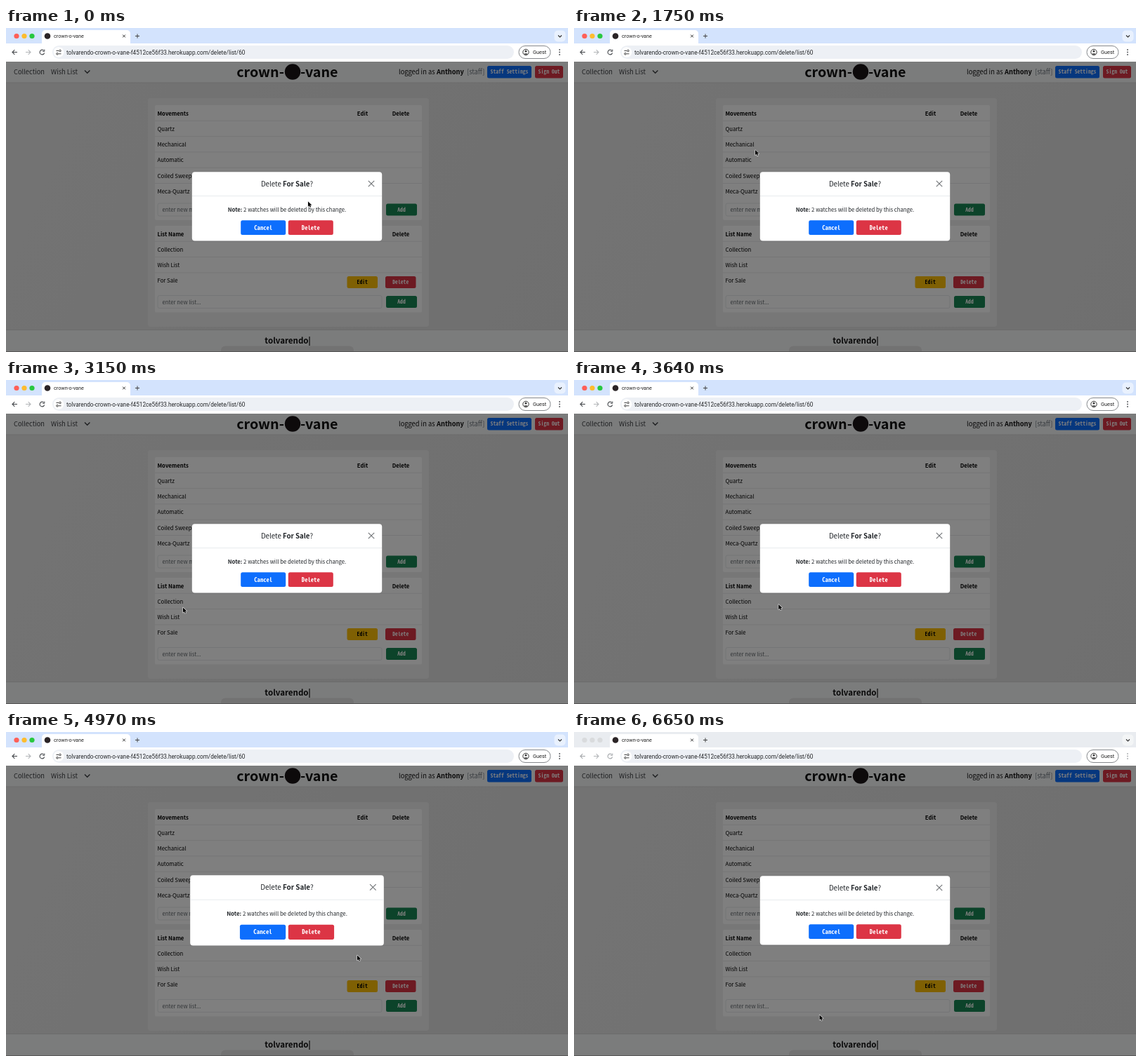
Write an HTML page with a canvas that moves like this. It is 800 by 462 pixels and loops after 6720 ms.

```html
<!DOCTYPE html>
<html lang="en">
<head>
<meta charset="utf-8">
<title>Delete list dialog</title>
<style>
html, body { margin: 0; width: 100%; height: 100%; overflow: hidden; }
canvas { display: block; width: 800px; height: 462px; }
</style>
</head>
<body>
<canvas id="stage" width="800" height="462"></canvas>
<script>
const ctx = document.getElementById('stage').getContext('2d');
const LOOP = 6720;
const BLUR_AT = 6650;
const SANS = '"Noto Sans CJK JP", "Noto Sans", sans-serif';
const MONO = '"Noto Sans Mono CJK JP", "Noto Sans Mono", monospace';
const UI = 'Roboto, "Liberation Sans", sans-serif';
const BLUE = '#0d6efd', RED = '#dc3545', GREEN = '#198754', YELLOW = '#ffc107';
const BRAND = 'crown-o-vane';
const AUTHOR = 'tolvarendo';

// time, x, y of the pointer tip
const POINTER = [
  [0, 430, 247.5], [300, 430, 247.5], [950, 428, 169], [1300, 428, 169],
  [1900, 227, 175], [2500, 227, 175], [3100, 252, 324.5], [3500, 252, 324.5],
  [4150, 576.5, 287], [4350, 576.5, 287], [4800, 500, 318.5], [5400, 500, 318.5],
  [6200, 349.5, 403.5], [LOOP, 349.5, 403.5]
];
const CLICKS = [2000, 4720];

function box(x, y, w, h, r, fill, stroke) {
  ctx.beginPath();
  ctx.roundRect(x, y, w, h, r);
  if (fill) { ctx.fillStyle = fill; ctx.fill(); }
  if (stroke) { ctx.strokeStyle = stroke; ctx.lineWidth = 1; ctx.stroke(); }
}

function dot(x, y, r, fill) {
  ctx.beginPath();
  ctx.arc(x, y, r, 0, Math.PI * 2);
  ctx.fillStyle = fill;
  ctx.fill();
}

function line(points, color, width = 1) {
  ctx.beginPath();
  points.forEach(([x, y], i) => i ? ctx.lineTo(x, y) : ctx.moveTo(x, y));
  ctx.strokeStyle = color;
  ctx.lineWidth = width;
  ctx.stroke();
}

function cross(x, y, r, color, width) {
  line([[x - r, y - r], [x + r, y + r]], color, width);
  line([[x + r, y - r], [x - r, y + r]], color, width);
}

function text(str, x, baseline, size, { family = SANS, weight = 400, color = '#111', align = 'left' } = {}) {
  ctx.font = `${weight} ${size}px ${family}`;
  ctx.textAlign = align;
  ctx.fillStyle = color;
  ctx.fillText(str, x, baseline);
  return ctx.measureText(str).width;
}

// Centred line made of [string, weight] parts
function richText(parts, cx, baseline, size) {
  const widthOf = ([str, weight]) => {
    ctx.font = `${weight} ${size}px ${SANS}`;
    return ctx.measureText(str).width;
  };
  let x = cx - parts.reduce((sum, part) => sum + widthOf(part), 0) / 2;
  for (const [str, weight] of parts) {
    x += text(str, x, baseline, size, { weight, color: '#212529' });
  }
}

function button(label, x, y, w, h, fill, color = '#fff', size = 7.7) {
  box(x, y, w, h, 2.5, fill);
  text(label, x + w / 2, y + h / 2 + size * 0.34, size,
    { family: MONO, weight: 700, color, align: 'center' });
}

function drawBrowser(active) {
  const icon = active ? '#474a4e' : '#a5a8ab';
  ctx.fillStyle = active ? '#d3e3fd' : '#e9ecf0';
  ctx.fillRect(0, 0, 800, 24);
  const lights = active ? ['#ff5f57', '#febc2e', '#28c840'] : Array(3).fill('#d9dbdd');
  lights.forEach((color, i) => dot(15 + i * 11, 11.5, 3.6, color));

  box(51, 3, 126, 22, [5, 5, 0, 0], '#fff');
  dot(59, 11.5, 4.3, '#2b2426');
  text(BRAND, 68, 14, 7.2, { family: UI, color: '#222' });
  cross(168, 11.5, 1.9, '#333', 1);
  line([[184, 11.5], [190, 11.5]], '#444');
  line([[187, 8.5], [187, 14.5]], '#444');
  box(780.5, 3.5, 16, 16, 5, active ? '#e9f1fe' : '#f3f5f6');
  line([[786, 10.5], [788.5, 13], [791, 10.5]], '#333', 1.2);

  ctx.fillStyle = '#fff';
  ctx.fillRect(0, 22, 800, 26);
  line([[16, 34.5], [9, 34.5]], icon, 1.1);
  line([[12.3, 31.2], [9, 34.5], [12.3, 37.8]], icon, 1.1);
  line([[28, 34.5], [35, 34.5]], '#b4b7ba', 1.1);
  line([[31.7, 31.2], [35, 34.5], [31.7, 37.8]], '#b4b7ba', 1.1);
  ctx.beginPath();
  ctx.arc(51.5, 34.5, 3.3, 0.3, 5.5);
  ctx.strokeStyle = icon;
  ctx.stroke();
  line([[54.8, 30.6], [54.8, 33.3], [52, 33.3]], icon, 1);

  box(66, 25, 657, 19, 9.5, '#edf0f5');
  dot(75, 34.5, 7.3, '#fff');
  line([[71.5, 32.5], [75, 32.5]], '#444');
  line([[75, 36.8], [78.5, 36.8]], '#444');
  for (const [x, y] of [[77, 32.5], [73, 36.8]]) {
    ctx.beginPath();
    ctx.arc(x, y, 1.3, 0, Math.PI * 2);
    ctx.stroke();
  }
  text(`${AUTHOR}-${BRAND}-f4512ce56f33.herokuapp.com/delete/list/60`, 86, 37.5, 8.2,
    { family: UI, color: '#26282b' });

  box(730, 25.5, 45, 18, 9, '#fff', '#85888c');
  ctx.beginPath();
  ctx.arc(740, 34.5, 4.2, 0, Math.PI * 2);
  ctx.strokeStyle = '#333';
  ctx.stroke();
  dot(740, 33.2, 1.4, '#333');
  line([[737.8, 37], [742.2, 37]], '#333', 1.4);
  text('Guest', 750, 37.3, 7.4, { family: UI, color: '#222' });
  [31, 34.5, 38].forEach(y => dot(788, y, 0.9, icon));
}

function drawHeader() {
  ctx.fillStyle = '#f8f9fa';
  ctx.fillRect(0, 48, 800, 30);
  ctx.fillStyle = '#d8d8d8';
  ctx.fillRect(0, 77.5, 800, 1);
  const link = { color: '#3c3f42' };
  text('Collection', 11, 66, 9.3, link);
  text('Wish List', 64, 66, 9.3, link);
  line([[112, 60.5], [115.7, 64.2], [119.4, 60.5]], '#3c3f42', 1.4);

  text('crown-', 396, 69.5, 19.7, { weight: 700, align: 'right' });
  dot(408, 62.5, 11.2, '#1a1517');
  text('-vane', 419, 69.5, 19.7, { weight: 700 });

  text('logged in as', 559, 66, 9.3);
  text('Anthony', 613, 66, 9.3, { weight: 700 });
  text('[staff]', 656, 66, 9.3, { color: '#6c757d' });
  button('Staff Settings', 685, 54, 63, 17.5, BLUE);
  button('Sign Out', 753, 54, 40, 17.5, RED);
}

function drawTable(top, bottom, title, rows, entry) {
  box(212, top, 380, bottom - top, 2, '#fff');
  const bold = { weight: 700, color: '#000' };
  text(title, 215.5, top + 14.5, 7.75, bold);
  const centred = { ...bold, align: 'center' };
  text('Edit', 507.5, top + 14.5, 7.75, centred);
  text('Delete', 562, top + 14.5, 7.75, centred);
  rows.forEach((row, i) => {
    const y = top + 22.3 * (i + 1);
    line([[212, y], [592, y]], '#e6e8ea', 0.8);
    text(row, 215.5, y + 14.5, 7.75, { color: '#000' });
  });
  const inputY = bottom - 24;
  box(216, inputY, 319, 18, 2.5, null, '#e9ebed');
  text(entry, 222.5, inputY + 12.2, 7.75, { color: '#656b70' });
  button('Add', 541, inputY + 0.5, 44, 17, GREEN);
}

function drawPage() {
  const shade = ctx.createLinearGradient(0, 78, 800, 430);
  shade.addColorStop(0, '#e8e8e8');
  shade.addColorStop(1, '#e0e0e0');
  ctx.fillStyle = shade;
  ctx.fillRect(0, 78, 800, 384);
  drawHeader();
  box(202, 100, 400, 326, 4, '#f0f0f0');
  drawTable(110, 274, 'Movements',
    ['Quartz', 'Mechanical', 'Automatic', 'Coiled Sweep', 'Meca-Quartz'], 'enter new movement...');
  drawTable(282, 405.5, 'List Name',
    ['Collection', 'Wish List', 'For Sale'], 'enter new list...');
  button('Edit', 485.5, 354, 43.5, 17, YELLOW, '#000');
  button('Delete', 540, 354, 43.5, 17, RED);

  ctx.fillStyle = '#f8f9fa';
  ctx.fillRect(0, 431, 800, 31);
  ctx.fillStyle = '#d8d8d8';
  ctx.fillRect(0, 430, 800, 1);
  text(AUTHOR, 430.5, 450, 11.5, { weight: 700, align: 'right' });
  line([[432, 440], [432, 453]], '#111', 1.2);
  box(306, 453.5, 189, 12, 7, '#e6e6e6');
  ctx.fillStyle = '#b0b0b0';
  ctx.fillRect(0, 461, 800, 1);
}

function drawBackdrop() {
  ctx.fillStyle = 'rgba(0,0,0,.5)';
  ctx.fillRect(0, 48, 800, 414);
}

function drawDialog(scale) {
  ctx.save();
  ctx.translate(400, 254.4);
  ctx.scale(scale, scale);
  ctx.translate(-400, -254.4);
  box(264.8, 205.3, 270.4, 98.2, 4, '#fff');
  line([[265, 239.5], [535, 239.5]], '#dee2e6', 0.7);
  richText([['Delete ', 400], ['For Sale', 700], ['?', 400]], 400, 225.5, 9.7);
  cross(520, 222, 4.2, '#75787b', 1.2);
  richText([['Note:', 700], [' 2 watches will be deleted by this change.', 400]], 400, 261.9, 7.75);
  button('Cancel', 334.2, 274.3, 64, 20.8, BLUE, '#fff', 8.65);
  button('Delete', 401.8, 274.3, 64, 20.8, RED, '#fff', 8.65);
  ctx.restore();
}

function drawPointer(x, y) {
  const outline = [[0, 0], [0, 7.2], [1.7, 5.7], [2.9, 8.3], [4.1, 7.8], [3, 5.2], [5.2, 5]];
  ctx.beginPath();
  outline.forEach(([dx, dy]) => ctx.lineTo(x + dx, y + dy));
  ctx.closePath();
  ctx.lineJoin = 'round';
  ctx.strokeStyle = '#e4e4e4';
  ctx.lineWidth = 1.2;
  ctx.stroke();
  ctx.fillStyle = '#000';
  ctx.fill();
  ctx.lineJoin = 'miter';
}

function pointerAt(t) {
  const i = POINTER.findIndex(([time]) => time > t);
  const [t0, x0, y0] = POINTER[i - 1];
  const [t1, x1, y1] = POINTER[i];
  const k = (t - t0) / (t1 - t0);
  const e = k * k * (3 - 2 * k);
  return [x0 + (x1 - x0) * e, y0 + (y1 - y0) * e];
}

// A click outside swells the dialog by 2%, then lets it settle
function dialogScale(t) {
  const easeOut = k => 1 - (1 - k) ** 2;
  for (const click of CLICKS) {
    const k = (t - click) / 300;
    if (k >= 0 && k < 1) return 1 + 0.02 * easeOut(k);
    if (k >= 1 && k < 2) return 1.02 - 0.02 * easeOut(k - 1);
  }
  return 1;
}

function render(now) {
  const t = now % LOOP;
  drawBrowser(t < BLUR_AT);
  drawPage();
  drawBackdrop();
  drawDialog(dialogScale(t));
  drawPointer(...pointerAt(t));
}

const start = performance.now();
function tick() {
  render(performance.now() - start);
  requestAnimationFrame(tick);
}
tick();
</script>
</body>
</html>
```
